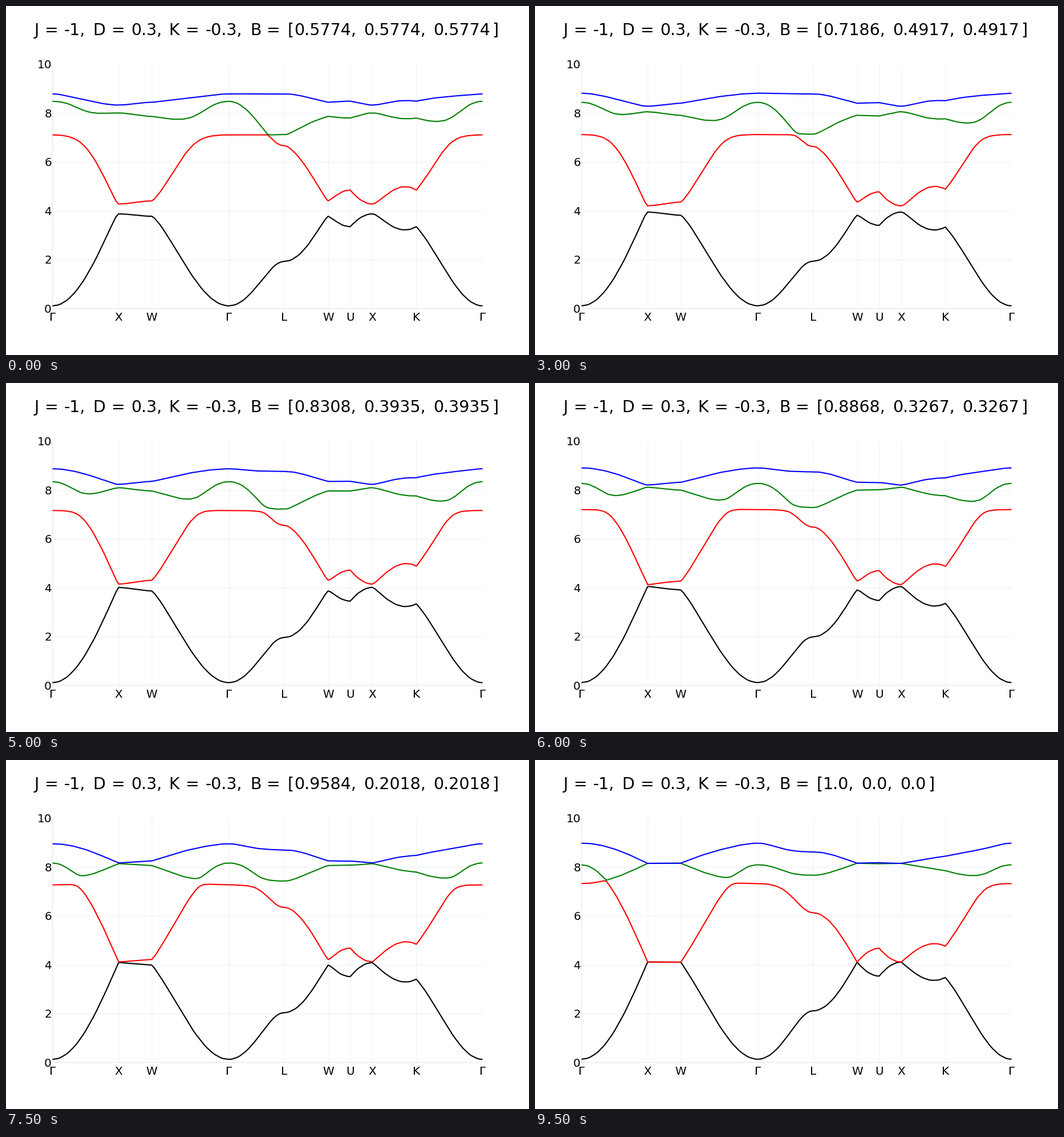
A matplotlib script that plays this animation: 917 by 611 pixels, repeating every 10000 ms.

```python
import numpy as np
import matplotlib.pyplot as plt
from matplotlib.animation import FuncAnimation

# Linear spin-wave bands of a pyrochlore ferromagnet, field turning from [111] to [100]
J, D, K = -1.0, -0.3, -0.3
ZEEMAN = 2 * 0.05788
STEPS, INTERVAL = 20, 500
W, H, DPI = 917, 611, 100
SCALE = W / 900
LEFT, RIGHT = 80 * SCALE, 820 * SCALE
TOP, BOTTOM = 100 * H / 600, 520 * H / 600

SITES = np.array([[0, 0, 0], [0, 1, 1], [1, 0, 1], [1, 1, 0]]) / 4
CENTER = np.full(3, 1 / 8)
AXES = (CENTER - SITES) / np.linalg.norm(CENTER - SITES, axis=1)[:, None]

POINTS = {"Γ": (0, 0, 0), "X": (1, 0, 0), "W": (1, .5, 0), "L": (.5, .5, .5),
          "U": (1, .25, .25), "K": (.75, .75, 0)}
ROUTE = "ΓXWΓLWUXKΓ"
LENGTHS = [6, 3, 7, 5, 4, 2, 2, 4, 6]
DENSITY = 4


def unit(v):
    return v / np.linalg.norm(v, axis=-1, keepdims=True)


def coupling_matrices():
    """Exchange and Dzyaloshinskii-Moriya matrix for each pair of sublattices."""
    pairs = np.zeros((4, 4, 3, 3))
    for i in range(4):
        for j in range(4):
            if i == j:
                continue
            middle = (SITES[i] + SITES[j]) / 2 - CENTER
            x, y, z = D * unit(np.cross(middle, SITES[j] - SITES[i]))
            pairs[i, j] = J * np.eye(3) + [[0, z, -y], [-z, 0, x], [y, -x, 0]]
    return pairs


PAIRS = coupling_matrices()
ONSITE = np.zeros((4, 4, 3, 3))
for s in range(4):
    ONSITE[s, s] = 2 * K * np.outer(AXES[s], AXES[s])
UNIFORM = 2 * PAIRS + ONSITE


def ground_states(fields):
    spins = np.repeat(fields[:, None, :], 4, axis=1)
    matrix = UNIFORM.transpose(0, 2, 1, 3).reshape(12, 12)
    for _ in range(2500):
        grad = (spins.reshape(-1, 12) @ matrix.T).reshape(-1, 4, 3)
        grad -= ZEEMAN * fields[:, None, :]
        spins = unit(spins - 0.1 * grad)
    return spins


def k_path():
    corners = [np.array(POINTS[p]) for p in ROUTE]
    path = [corners[0]]
    for a, b, n in zip(corners, corners[1:], LENGTHS):
        t = np.arange(1, n * DENSITY + 1)[:, None] / (n * DENSITY)
        path.extend(a + (b - a) * t)
    return np.array(path)


def bands(field, spins, path):
    e1 = unit(np.cross(spins, [0, 1, -1]))
    u = e1 + 1j * np.cross(spins, e1)
    offsets = SITES[None, :] - SITES[:, None]
    hop = 2 * np.cos(2 * np.pi * np.einsum("kx,ijx->kij", path, offsets))

    def project(a, b):
        pair = np.einsum("ix,ijxy,jy->ij", a, PAIRS, b) / 2
        return hop * pair + np.einsum("ix,ijxy,jy->ij", a, ONSITE, b) / 2

    local = ZEEMAN * spins @ field - np.einsum("ix,ijxy,jy->i", spins, UNIFORM, spins)
    normal = project(u, u.conj()) + np.diag(local)
    mixed = project(u, u)
    top = np.concatenate([normal, mixed], axis=2)
    low = np.concatenate([-mixed.conj(), -normal.conj()], axis=2)
    energies = np.linalg.eigvals(np.concatenate([top, low], axis=1)).real
    return np.sort(energies, axis=1)[:, 4:]


def to_y(value):
    return BOTTOM - value * (BOTTOM - TOP) / 10


def simplify(points, tolerance=0.75 * SCALE):
    """Merge runs of nearly straight points, keeping both ends of each run."""
    kept, start, last = [0], 0, len(points) - 1
    while start < last:
        ux, uy = unit(points[start + 1] - points[start])
        end, low, high = start + 1, 0.0, 0.0
        while end < last:
            dx, dy = points[end + 1] - points[start]
            deviation = dx * uy - dy * ux
            low, high = min(low, deviation), max(high, deviation)
            if high - low > tolerance:
                break
            end += 1
        start = min(end + 1, last)
        kept += [end, start]
    return points[kept]


tilt = np.linspace(1, 0, STEPS)
FIELDS = unit(np.stack([np.ones(STEPS), tilt, tilt], axis=1))
PATH = k_path()
XS = np.linspace(LEFT, RIGHT, len(PATH))
CURVES = [[simplify(np.column_stack([XS, ys])) for ys in to_y(bands(b, s, PATH)).T]
          for b, s in zip(FIELDS, ground_states(FIELDS))]

fig = plt.figure(figsize=(W / DPI, H / DPI), dpi=DPI, facecolor="white")
ax = fig.add_axes([0, 0, 1, 1])
ax.set_xlim(0, W)
ax.set_ylim(H, 0)
ax.axis("off")


def px(size):
    return size * 72 / DPI


def label(x, y, text, size, align="left"):
    return ax.text(x, y, text, fontsize=px(size), family="DejaVu Sans",
                   ha=align, va="baseline", color="black")


def rule(xs, ys, width):
    ax.plot(xs, ys, color="#EBF0F8", lw=px(width * SCALE),
            solid_capstyle="butt", snap=False, zorder=1)


ticks = LEFT + np.cumsum([0] + LENGTHS) * (RIGHT - LEFT) / sum(LENGTHS)
for n, (x, name) in enumerate(zip(ticks, ROUTE)):
    if n == 0:
        rule([x, x], [TOP, BOTTOM], 2)
    elif n < len(ROUTE) - 1:
        rule([x + 0.5, x + 0.5], [TOP, BOTTOM], 1)
    label(x, 551.3, name, 20, "center")
for value in range(0, 11, 2):
    y = to_y(value)
    if value == 0:
        rule([LEFT, RIGHT], [y, y], 2)
    elif value < 10:
        rule([LEFT, RIGHT], [y + 0.5, y + 0.5], 1)
    label(80, y + 7.3, str(value), 20, "right")

TITLE_SIZE, TITLE_Y = 28.5, 51
DIGIT, DOT = 18.13, 10.4
for x, word in [(49, "J"), (68, "="), (102, "-1,"), (152.5, "D"), (184.5, "="),
                (218.8, "0.3,"), (285.5, "K"), (314.5, "="), (349.5, "-0.3,"),
                (428.5, "B"), (457.5, "="), (493, "[")]:
    label(x, TITLE_Y, word, TITLE_SIZE)
numbers = [label(0, TITLE_Y, "", TITLE_SIZE) for _ in range(3)]
bracket = label(0, TITLE_Y, "]", TITLE_SIZE)

lines = [ax.plot([], [], color=c, lw=px(2.1), solid_capstyle="butt",
                 solid_joinstyle="round", snap=False, zorder=3)[0]
         for c in ("black", "red", "green", "blue")]


def update(frame):
    for line, curve in zip(lines, CURVES[frame]):
        line.set_data(curve[:, 0], curve[:, 1])
    x = 505
    for text, value in zip(numbers, FIELDS[frame]):
        word = str(round(float(value), 4))
        text.set_text(word)
        text.set_x(x)
        end = x + DIGIT * (len(word) - 1) + DOT
        x = end + 2 * DOT
        if text is not numbers[-1]:
            text.set_text(word + ",")
    bracket.set_x(end + 2.5)
    return lines + numbers + [bracket]


anim = FuncAnimation(fig, update, frames=STEPS, interval=INTERVAL,
                     repeat=True, repeat_delay=0, blit=False)
plt.show()
```
